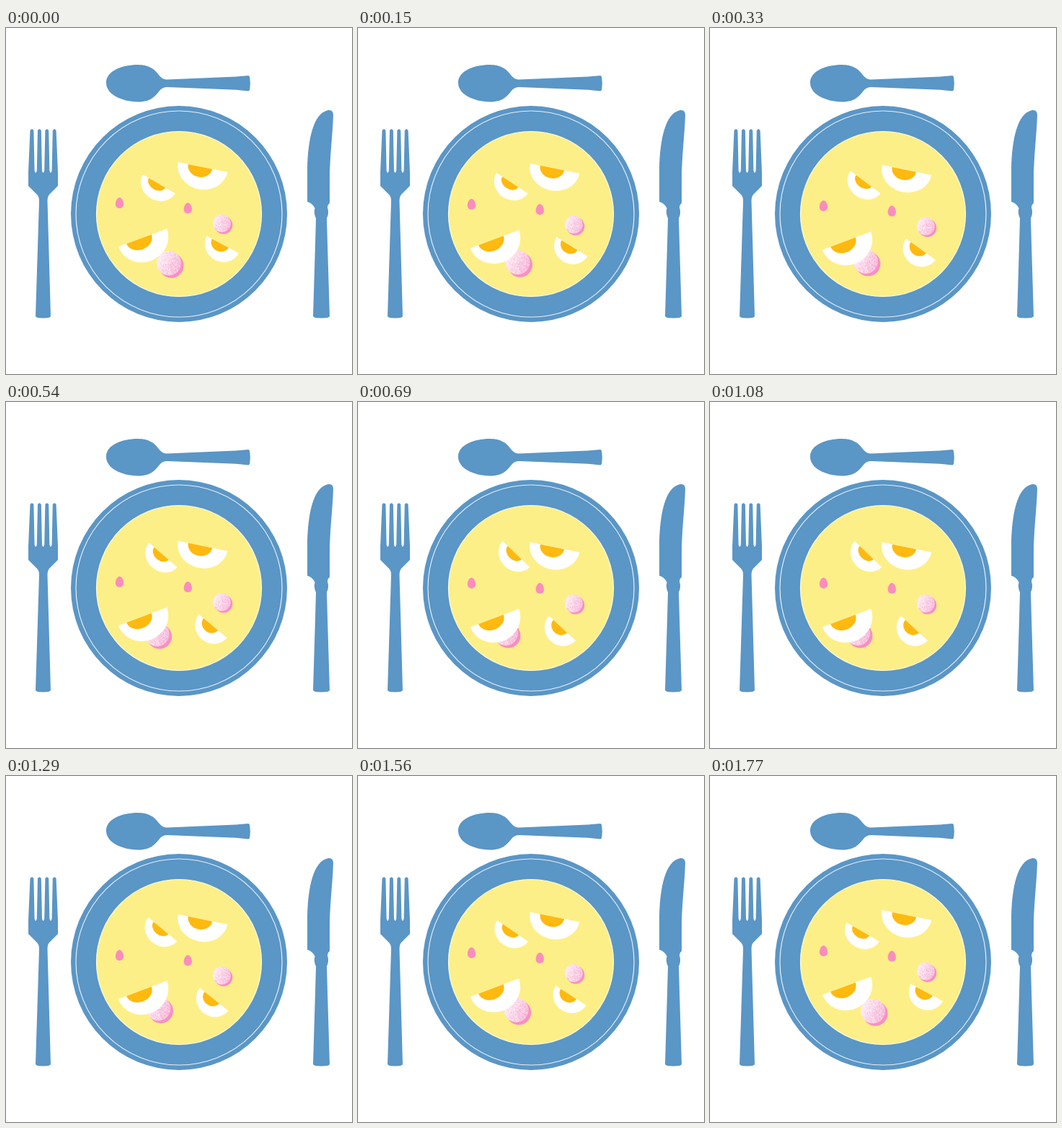
An HTML page that plays this animation: 480 px wide and 480 px high, repeating every 1800 ms.

```html
<!DOCTYPE html>
<html lang="en">
<head>
<meta charset="utf-8">
<title>Plate</title>
<style>
  html, body { margin: 0; width: 100%; height: 100%; overflow: hidden; background: #fff; }
  svg { display: block; width: 100vw; height: 100vh; }
</style>
</head>
<body>
<svg id="stage" viewBox="0 0 480 480">
  <defs>
    <linearGradient id="candy" x1="0" y1=".3" x2="1" y2=".7">
      <stop offset="0" stop-color="#fdeaf3"/>
      <stop offset="1" stop-color="#f8bedd"/>
    </linearGradient>
  </defs>
  <g id="cutlery" fill="#5a96c6">
    <path d="M139 76C139 60 160 51 183 51C198 51 206 57 211 64C215 69 218 71.5 224 71.5L319 67.6L336 66Q338 66 338.3 70Q339.4 77 338.3 84Q338 87.5 336 87.5L319 85.7L224 82Q217 82 213 87C206 96 200 102.500 183 102.500C160 102 139 92 139 76Z"/>
    <path d="M447 114Q454 113 454 121C453 150 449 180 449 210V243Q446 245 446 249Q448.500 257 445 264L446 300L449 400Q448 402.500 437.500 402.500Q427 402.500 426 400L429 300L430 264Q426.500 257 428.500 250Q425 243 418 241V195C419 155 426 118 447 114Z"/>
  </g>
  <circle cx="240" cy="258" r="150" fill="#5a96c6"/>
  <circle cx="240" cy="258" r="143" fill="none" stroke="#e3eef6" stroke-width="1.2"/>
  <circle cx="240" cy="258" r="114.500" fill="#fdef87" stroke="#fffbe0" stroke-width="1.2"/>
  <g id="food"></g>
</svg>
<script>
const LOOP = 1800, STEP = 30;
const food = document.getElementById('food');
const parts = [];

function add(parent, tag, attrs) {
  const el = document.createElementNS('http://www.w3.org/2000/svg', tag);
  for (const key in attrs) el.setAttribute(key, attrs[key]);
  return parent.appendChild(el);
}

// A part slides by (dx, dy) and turns from angle by spin, then returns.
function part(x, y, dx, dy, angle = 0, spin = 0) {
  const el = add(food, 'g', {});
  parts.push({ el, x, y, dx, dy, angle, spin });
  return el;
}

function seeded(seed) {
  return () => (seed = seed * 16807 % 2147483647) / 2147483647;
}

function fork() {
  let d = 'M31 200L33.500 142';
  for (let i = 0; i < 4; i++) {
    const x = 36 + i * 10.4;
    d += `Q${x} 138.500 ${x + 2.4} 142`;
    if (i < 3) d += `L${x + 3.6} 198Q${x + 5.2} 204 ${x + 6.8} 198L${x + 8} 142`;
  }
  d += 'L72 200V219L60 231Q57.500 234 57.500 240L62 400Q61 402.500 51.500 402.500' +
       'Q42 402.500 41 400L46 240Q46 234 43 231L31 219Z';
  add(document.getElementById('cutlery'), 'path', { d });
}

const half = (rx, ry) => `M${-rx} 0A${rx} ${ry} 0 0 0 ${rx} 0Z`;

function boiledEgg(place, white, yolk, shift) {
  const g = part(...place);
  add(g, 'path', { d: half(...white), fill: '#fff' });
  add(g, 'path', { d: half(...yolk), fill: '#ffb90f', transform: `translate(${shift})` });
}

function sugarBall(place, r, seed) {
  const g = part(...place), rand = seeded(seed);
  add(g, 'circle', { cx: r * .2, cy: r * .2, r: r * 1.01, fill: '#fa8fc2' });
  add(g, 'circle', { r, fill: 'url(#candy)' });
  const dots = { '#fff': '', '#f59bc9': '' };
  for (let i = 0; i < r * r; i++) {
    const a = rand() * Math.PI * 2, q = Math.sqrt(rand()) * (r - .7);
    const x = q * Math.cos(a), y = q * Math.sin(a);
    const pink = rand() < .35 + .4 * (x + y * .5) / r;
    dots[pink ? '#f59bc9' : '#fff'] += `M${x.toFixed(1)} ${y.toFixed(1)}h.01`;
  }
  for (const stroke in dots) {
    add(g, 'path', { d: dots[stroke], stroke, 'stroke-width': .95, 'stroke-linecap': 'round', opacity: .8 });
  }
}

function drop(place) {
  add(part(...place), 'path', {
    d: 'M0 -7.500C3.500 -7.500 5.600 -2 5.600 1.500C5.600 5.500 3 7.400 0 7.400S-5.600 5.500 -5.600 1.500C-5.600 -2 -3.500 -7.500 0 -7.500Z',
    fill: '#fa8dbd'
  });
}

fork();
sugarBall([226, 326.3, -27, -7], 17, 41);
sugarBall([299.3, 270.8, 0, 11], 12.4, 97);
drop([157.5, 242.7, 0, 11]);
drop([252.3, 250, 0, 11]);
boiledEgg([212.3, 216.4, 9.3, -6.8, 30, 18], [26, 23], [13.3, 10], -3);
boiledEgg([273, 193, 0, 11, 11.5], [35, 31], [17, 14.5], -3.6);
boiledEgg([189.5, 291, 0, 11, -20.5], [36, 34], [18.5, 15], -5.3);
boiledEgg([300.8, 300.5, -22.3, 17.2, 28.5, 19], [25.3, 24], [13, 11.5], -4);

function draw(time) {
  const last = LOOP / STEP - 1;
  const step = Math.floor(time % LOOP / STEP);
  const p = 1 - Math.abs(2 * step / last - 1);
  for (const { el, x, y, dx, dy, angle, spin } of parts) {
    el.setAttribute('transform', `translate(${x + dx * p} ${y + dy * p}) rotate(${angle + spin * p})`);
  }
}

const start = performance.now();
function tick() {
  draw(performance.now() - start);
  requestAnimationFrame(tick);
}
tick();
</script>
</body>
</html>
```
